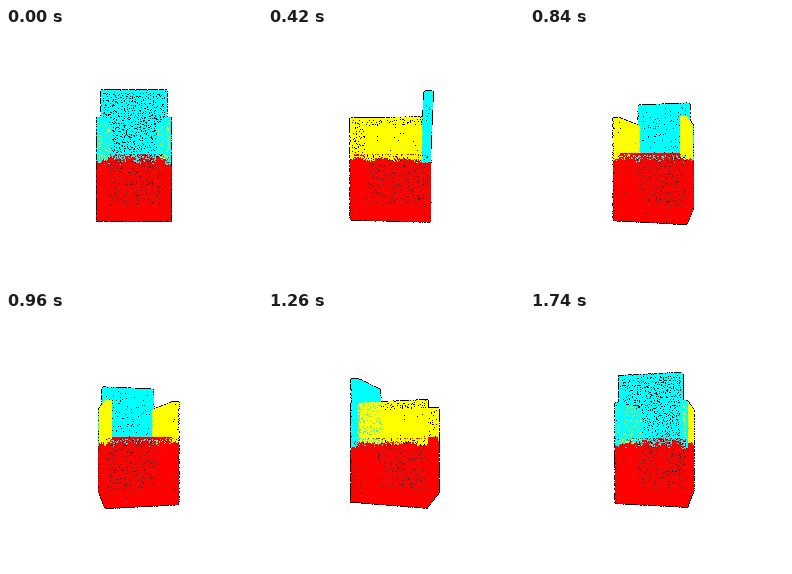
A matplotlib script for the animation above (1800 ms loop, 256 by 256 pixels).

```python
import numpy as np
import matplotlib.pyplot as plt
from matplotlib.animation import FuncAnimation

SIZE, FRAMES, STEP = 256, 30, 60
CAMERA = 260                 # distance from the camera to the turning axis
W, FRONT, REAR = 32.2, -37.4, 33
BOTTOM, SEAT, ARM, TOP = -56.7, 2.2, 33.3, 56.7
INNER = 27                   # inner side of the armrests
BACK_W, BACK_IN, BACK_TOP = 28, 26, 35.3
RED, YELLOW, CYAN = (255, 0, 0), (255, 255, 0), (0, 255, 255)
DENSITY = 0.5                # points per square unit
FILL, RIM = 0.75, 1.4        # radius of a dot and of its dark rim

rng = np.random.default_rng(8)


def quad(origin, u, v):
    """Evenly scattered points on the parallelogram origin + a*u + b*v."""
    u, v = np.array(u, float), np.array(v, float)
    nu, nv = (max(1, round(np.linalg.norm(s) * DENSITY ** 0.5)) for s in (u, v))
    cells = np.indices((nu, nv)).reshape(2, -1)
    a, b = (cells + rng.random(cells.shape)) / [[nu], [nv]]
    return np.array(origin, float) + a[:, None] * u + b[:, None] * v


def base():
    depth, height = REAR - FRONT, SEAT - BOTTOM
    return np.vstack([
        quad((-W, BOTTOM, FRONT), (2 * W, 0, 0), (0, 0, depth)),
        quad((-W, SEAT, FRONT), (2 * W, 0, 0), (0, 0, depth)),
        quad((-W, BOTTOM, FRONT), (2 * W, 0, 0), (0, height, 0)),
        quad((-W, BOTTOM, REAR), (2 * W, 0, 0), (0, height, 0)),
        quad((-W, BOTTOM, FRONT), (0, 0, depth), (0, height, 0)),
        quad((W, BOTTOM, FRONT), (0, 0, depth), (0, height, 0)),
    ])


def arm(side):
    depth, height, thick = REAR - FRONT, ARM - SEAT, side * (W - INNER)
    x = side * INNER
    return np.vstack([
        quad((x, SEAT, FRONT), (0, 0, depth), (0, height, 0)),
        quad((x + thick, SEAT, FRONT), (0, 0, depth), (0, height, 0)),
        quad((x, ARM, FRONT), (0, 0, depth), (thick, 0, 0)),
        quad((x, SEAT, FRONT), (thick, 0, 0), (0, height, 0)),
        quad((x, SEAT, REAR), (thick, 0, 0), (0, height, 0)),
    ])


def backrest():
    height, lean, thick = TOP - SEAT, BACK_TOP - REAR, REAR - BACK_IN
    up, wide = (0, height, lean), (2 * BACK_W, 0, 0)
    return np.vstack([
        quad((-BACK_W, SEAT, REAR), wide, up),
        quad((-BACK_W, SEAT, BACK_IN), wide, up),
        quad((-BACK_W, TOP, BACK_IN + lean), wide, (0, 0, thick)),
        quad((-BACK_W, SEAT, BACK_IN), up, (0, 0, thick)),
        quad((BACK_W, SEAT, BACK_IN), up, (0, 0, thick)),
    ])


def paint(p):
    """Colour by part, with a wavy border below the seat line."""
    x, y, z = p.T
    behind, beside = z > BACK_IN, abs(x) > INNER
    wave = 1.5 * np.sin(0.45 * x + 0.3 * z)
    wave += rng.normal(0, 1, len(p)) * np.where(behind & ~beside, 2, 0.8)
    border = np.where(behind, np.where(beside, -6, -3.5), -3) + wave
    upper = (y > SEAT + 0.1) | ((behind | beside) & (y > border))
    rgb = np.full((len(p), 3), RED)
    rgb[upper] = YELLOW
    rgb[upper & behind] = CYAN
    return rgb


points = np.vstack([base(), arm(-1), arm(1), backrest()])
colors = paint(points)


def render(i):
    t = 2 * np.pi * i / FRAMES
    x, y, z = points.T
    depth = z * np.cos(t) - x * np.sin(t)
    order = np.argsort(depth)
    scale = CAMERA / (CAMERA - depth)
    px = (SIZE / 2 + (x * np.cos(t) + z * np.sin(t)) * scale)[order]
    py = (SIZE / 2 - y * scale)[order]
    rgb = colors[order]
    img = np.full((SIZE, SIZE, 3), 255, np.uint8)

    # all pixels around each point, kept in far-to-near order
    dy, dx = np.mgrid[-1:2, -1:2].reshape(2, 1, -1)
    cx = np.floor(px).astype(int)[:, None] + dx
    cy = np.floor(py).astype(int)[:, None] + dy
    dist = np.hypot(cx + 0.5 - px[:, None], cy + 0.5 - py[:, None])
    rim, fill = dist < RIM, dist < FILL
    img[cy[rim], cx[rim]] = 0
    img[cy[fill], cx[fill]] = rgb[np.nonzero(fill)[0]]
    return img


fig = plt.figure(figsize=(SIZE / 100, SIZE / 100), dpi=100)
ax = fig.add_axes([0, 0, 1, 1])
ax.axis("off")
view = ax.imshow(render(0), interpolation="nearest", aspect="auto")


def update(i):
    view.set_data(render(i))
    return [view]


anim = FuncAnimation(fig, update, frames=FRAMES, interval=STEP, repeat=True)
plt.show()
```
